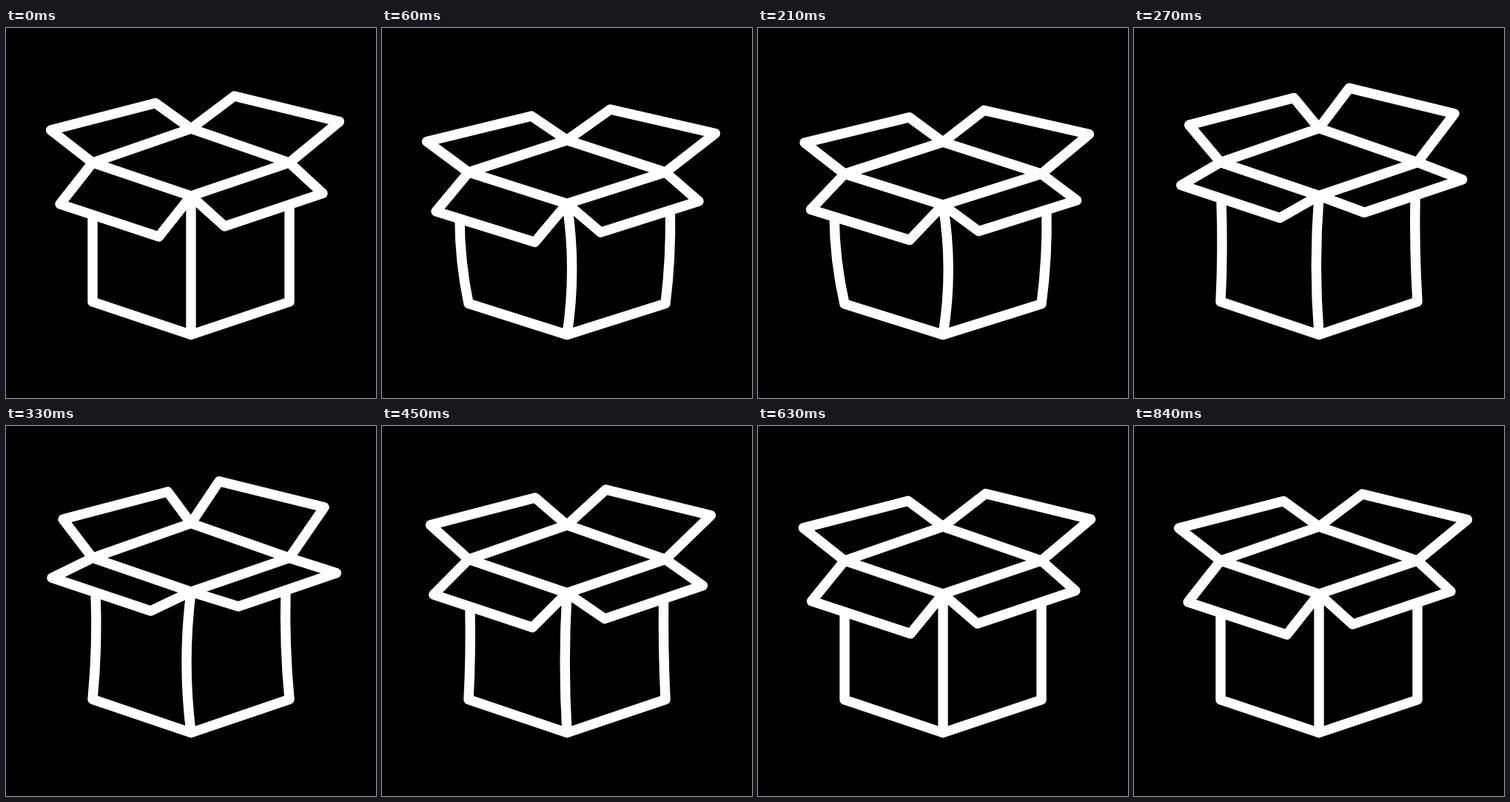
Write an HTML page with a canvas that moves like this. It is 500x500 px and loops after 900 ms.

```html
<!DOCTYPE html>
<html>
<head>
<meta charset="utf-8">
<style>
html, body { margin: 0; width: 100%; height: 100%; overflow: hidden; background: #000; }
canvas { display: block; }
</style>
</head>
<body>
<canvas id="stage" width="500" height="500"></canvas>
<script>
const ctx = document.getElementById('stage').getContext('2d');
const LOOP = 900, STEP = 30, SQUASHED = 150, STRETCHED = 330, SETTLED = 560, END = 840;
const FLOOR = 414.5;

const back = [250, 136], left = [117, 182], right = [383, 182], front = [250, 227];

// Each flap: two hinge points, two free corners, and how far the corners travel when raised.
const flaps = [
  { hinge: [left, back], tips: [[60.5, 138], [202, 101.5]], lift: [16.5, -7.5] },
  { hinge: [back, right], tips: [[308.5, 92], [450.5, 126.5]], lift: [-20.5, -12] },
  { hinge: [left, front], tips: [[73, 238], [206.5, 282]], lift: [-11, -29.5] },
  { hinge: [front, right], tips: [[295.5, 268], [428, 223.5]], lift: [18.5, -21.5] },
];

const clamp = x => Math.min(1, Math.max(0, x));
const progress = (t, from, to) => clamp((t - from) / (to - from));
const easeOut = x => 1 - (1 - x) ** 2.4;
const easeInOut = x => x < 0.5 ? 4 * x ** 3 : 1 - 4 * (1 - x) ** 3;
const sineInOut = x => (1 - Math.cos(Math.PI * x)) / 2;

function decay(ms) {
  const rest = Math.exp(-(END - STRETCHED) / 100);
  return Math.max(0, (Math.exp(-ms / 100) - rest) / (1 - rest));
}

function poseAt(t) {
  const rise = easeInOut(progress(t, SQUASHED, STRETCHED));
  return {
    squash: easeOut(progress(t, 0, SQUASHED)) * (1 - rise),
    stretch: rise * (1 - sineInOut(progress(t, STRETCHED, SETTLED))),
    lift: t < STRETCHED ? rise : decay(t - STRETCHED),
  };
}

function draw(t) {
  const { squash, stretch, lift } = poseAt(t);
  const scale = 1 - 0.079 * squash + 0.016 * stretch;
  const place = ([x, y]) => [x, FLOOR + (y - FLOOR) * scale];
  const bend = (squashed, stretched) => squashed * squash + stretched * stretch;

  const line = points => points.forEach((p, i) => i ? ctx.lineTo(...p) : ctx.moveTo(...p));
  const curve = (from, bulge, to) => {
    ctx.moveTo(...from);
    ctx.quadraticCurveTo(to[0] + bulge, (from[1] + to[1]) / 2, ...to);
  };

  ctx.fillStyle = '#000';
  ctx.fillRect(0, 0, 500, 500);
  ctx.strokeStyle = '#fff';
  ctx.lineWidth = 13.4;
  ctx.lineCap = ctx.lineJoin = 'round';
  ctx.beginPath();

  line([left, back, right, front, left].map(place));
  const edges = flaps.map(({ hinge, tips, lift: [dx, dy] }) => {
    const edge = tips.map(([x, y]) => place([x + dx * lift, y + dy * lift]));
    line([place(hinge[0]), ...edge, place(hinge[1])]);
    return edge;
  });

  // The side walls start under the outer edges of the front flaps.
  const onEdge = ([[x1, y1], [x2, y2]], x) => [x, y1 + (y2 - y1) * (x - x1) / (x2 - x1)];
  const bottom = [250, FLOOR], bottomLeft = place([117, 370]), bottomRight = place([383, 370]);
  curve(onEdge(edges[2], 117 + bend(-17, 4)), bend(-17, 7), bottomLeft);
  curve(onEdge(edges[3], 383 + bend(9, -5)), bend(11, -7), bottomRight);
  curve(place(front), bend(19, -12), bottom);
  line([bottomLeft, bottom, bottomRight]);
  ctx.stroke();
}

function tick() {
  draw(Math.floor(performance.now() % LOOP / STEP) * STEP);
  requestAnimationFrame(tick);
}
tick();
</script>
</body>
</html>
```
